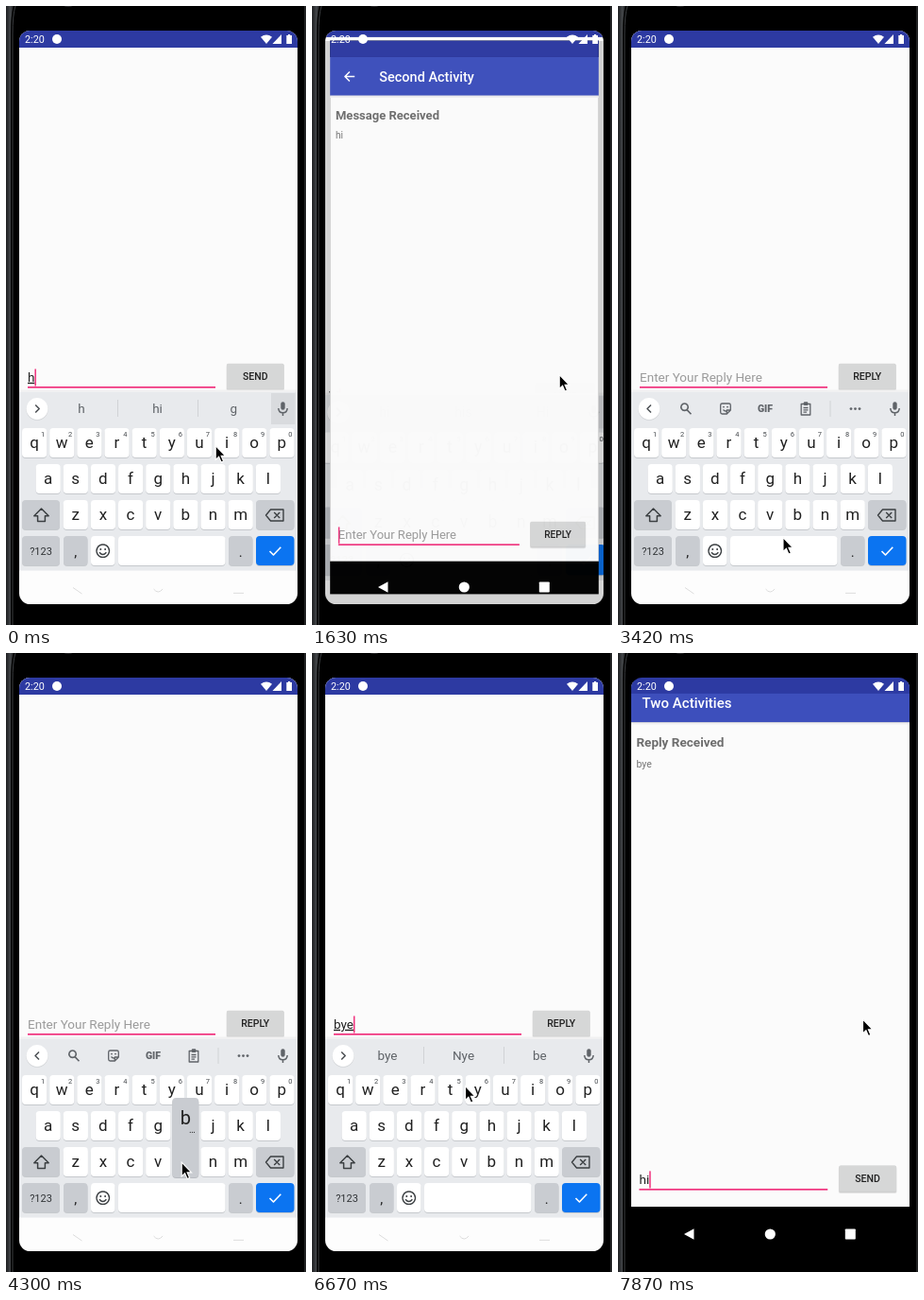
Animation, 318 px wide and 654 px high, one loop 8 s. Source, as an HTML page:

```html
<!DOCTYPE html>
<html lang="en">
<head>
<meta charset="utf-8">
<title>Two Activities</title>
<style>
html, body { margin: 0; width: 100%; height: 100%; overflow: hidden; background: #000; }
svg { display: block; width: 318px; height: 654px; font-family: Roboto, sans-serif; }
text { white-space: pre; }
.mid { text-anchor: middle; }
</style>
</head>
<body>
<svg id="stage" viewBox="0 0 318 654" xmlns="http://www.w3.org/2000/svg">
  <defs>
    <clipPath id="glass"><rect x="14" y="26" width="295" height="606" rx="11.5"/></clipPath>
    <linearGradient id="rim"><stop offset="0" stop-color="#1c1d1f"/><stop offset=".6" stop-color="#45484b"/><stop offset="1" stop-color="#17181a"/></linearGradient>
  </defs>
  <rect width="318" height="654"/>
  <path d="M0 0H8Q5 9 5 30V654H0Z" fill="url(#rim)"/>
  <path d="M10 0Q7 9 7 30V654" stroke="#3a3c3f" fill="none"/>
  <path d="M317 0V654" stroke="#2b2c2e" stroke-width="1.5"/>
  <ellipse cx="66" cy="-1" rx="5" ry="2" fill="#2a2a2c"/>
  <g id="screen" clip-path="url(#glass)"></g>
  <path id="mouse" d="M-.8 0V15L2.6 11.8L5.2 17.6L7.6 16.5L5.1 10.9H9.6Z" stroke="#fff" stroke-width="1.1"/>
</svg>
<script>
const LOOP = 8000, TICK = 148.3, LEAD = 10, LAST = 53;
const INK = '#212121', GREY = '#5f6368', PINK = '#f0307c', BAR = '#3d4fbc', STATUS = '#2d3aa2';
const PAN = 175, CX = 161.5, CY = 329;
const $ = id => document.getElementById(id);
const screen = $('screen');

function el(tag, attrs, parent, text) {
  const node = document.createElementNS('http://www.w3.org/2000/svg', tag);
  for (const key in attrs) node.setAttribute(key, attrs[key]);
  if (text !== undefined) node.textContent = text;
  parent.append(node);
  return node;
}
const group = (parent, attrs = {}) => el('g', attrs, parent);
const box = (p, x, y, width, height, fill, rx = 0) => el('rect', { x, y, width, height, fill, rx }, p);
const label = (p, x, y, size, fill, text, more = {}) =>
  el('text', { x, y, 'font-size': size, fill, ...more }, p, text);
const middle = (p, x, y, size, fill, text, more = {}) =>
  label(p, x, y, size, fill, text, { class: 'mid', ...more });
const line = (p, d, stroke, width = 1.4) =>
  el('path', { d, stroke, fill: 'none', 'stroke-width': width, 'stroke-linejoin': 'round' }, p);
const shape = (p, d, fill) => el('path', { d, fill }, p);
const dot = (p, cx, cy, r, fill) => el('circle', { cx, cy, r, fill }, p);
const show = (node, on) => node.setAttribute('visibility', on ? 'inherit' : 'hidden');
const zoom = s => `translate(${CX} ${CY}) scale(${s}) translate(${-CX} ${-CY})`;

// One app window: panning page with toolbar, message, input and button.
function makeWindow({ title, back, heading, message, action, hint }) {
  const root = group(screen);
  box(root, 14, 26, 295, 606, '#000');
  const page = group(root);
  box(page, 14, 44, 295, 552, '#fbfbfb');
  box(page, 14, 86, 295, 1, '#d2d3d8');
  box(page, 14, 87, 295, 1.5, '#efeff1');
  box(page, 14, 44, 295, 42, BAR);
  if (back) line(page, 'M41 65.2H30.5M35.5 60L30.3 65.2L35.5 70.4', '#fff', 1.5);
  label(page, back ? 68 : 26, 70.7, 15, '#fff', title, { 'font-weight': 500 });
  label(page, 20, 112, 13.5, '#6d6d6d', heading, { 'font-weight': 700 });
  label(page, 20, 133.5, 10.5, '#757575', message);
  const ghost = label(page, 23, 571.8, 13.5, '#9b9b9b', hint);
  const input = label(page, 23, 571.8, 13.5, INK, '');
  box(page, 23, 577, 199, 1.7, PINK);
  const caret = box(page, 23, 558.5, 1.5, 18, PINK);
  box(page, 233.5, 554, 61.5, 28, '#e4e4e4', 2);
  box(page, 234, 553, 60.5, 28, '#cfcfcf', 1.5);
  const button = box(page, 234, 552.7, 60.5, 27, '#d6d7d7', 1.5);
  middle(page, 264.2, 570.2, 10.5, INK, action, { 'font-weight': 500 });
  box(root, 14, 26, 295, 18, STATUS);
  return {
    root,
    update({ text, caretOn, pressed, pan, scale, alpha, composing }) {
      input.textContent = text;
      input.setAttribute('text-decoration', composing ? 'underline' : 'none');
      show(ghost, !text);
      show(caret, caretOn);
      caret.setAttribute('x', 23 + (text ? input.getComputedTextLength() : 0));
      button.setAttribute('fill', pressed ? '#c2c3c3' : '#d6d7d7');
      page.setAttribute('transform', `translate(0 ${-pan})`);
      root.setAttribute('transform', zoom(scale));
      root.setAttribute('opacity', alpha);
    }
  };
}

const first = makeWindow({ title: 'Two Activities', heading: 'Reply Received', message: 'bye', action: 'SEND', hint: '' });
const board = group(screen);
const scrim = box(screen, 14, 37, 295, 595, 'rgba(0,0,0,.17)');
const second = makeWindow({ title: 'Second Activity', back: true, heading: 'Message Received', message: 'hi', action: 'REPLY', hint: 'Enter Your Reply Here' });

// Keyboard
const ROWS = ['qwertyuiop', 'asdfghjkl', 'zxcvbnm'], PITCH = 29.15;
const keyAt = {};
function key(x, y, w, fill = '#fff') {
  box(board, x, y + 1, w, 31, '#c6c9cd', 4);
  box(board, x, y, w, 31, fill, 4);
}
const DARK = '#c9ccd1';
box(board, 14, 405.5, 295, 3, '#f1f1f2');
box(board, 14, 408, 295, 189, '#e8eaed');
box(board, 14, 596.5, 295, 36, '#fdfdfd');
ROWS.forEach((row, r) => [...row].forEach((ch, i) => {
  const x = [30, 44.6, 73.7][r] + i * PITCH, y = 446 + r * 38;
  keyAt[ch] = [x, y];
  key(x - 13, y, 26.2);
  middle(board, x, y + 20.8, 17, INK, ch);
  if (!r) middle(board, x + 9, y + 9, 7.5, '#45494d', (i + 1) % 10);
}));
key(17, 522, 40, DARK);
line(board, 'M37.5 531L29.8 538.8H33.6V544.5H41.4V538.8H45.2Z', '#3c4043', 1.5);
key(265, 522, 40.5, DARK);
line(board, 'M275.5 538L280.5 532H294V544H280.5ZM284.2 535L290.2 541M290.2 535L284.2 541', '#3c4043');
key(17, 560, 40, DARK);
middle(board, 37, 579.6, 11, '#303336', '?123');
key(61, 560, 25.5, DARK);
middle(board, 73.8, 582, 15, INK, ',');
key(90, 560, 25.5);
line(board, 'M102.7 569a6.7 6.7 0 1 0 .1 0ZM99 577.2q3.7 4.6 7.4 0', '#3c4043');
dot(board, 100.3, 574, 1, '#3c4043');
dot(board, 105.1, 574, 1, '#3c4043');
key(119, 560, 113.5);
key(236, 560, 25.5, DARK);
middle(board, 248.8, 582, 15, INK, '.');
key(265, 560, 40.5, '#0b74f1');
line(board, 'M279.5 576L283.5 580L291.3 571.8', '#fff', 1.6);
const faint = line(board, 'M71 614.5L80.5 621M156.5 616q4.8 6 9.6 0M241 620.3H252', '#dcdcdc', 1);

const micGlow = box(board, 281, 409, 25.5, 33, '#d9dbde');
dot(board, 33, 426.2, 11.6, '#d5d7da');
dot(board, 33, 425.5, 11.4, '#fff');
const chevron = line(board, '', '#4a4e52', 1.5);
box(board, 291.3, 418.2, 4.4, 8.6, GREY, 2.2);
line(board, 'M288.8 425q.2 4.8 4.7 4.8t4.7-4.8M293.5 430V433', GREY, 1.5);

const tools = group(board);
line(tools, 'M70.5 420a3.7 3.7 0 1 0 .1 0ZM73.3 426.9L77.5 431.2', GREY, 1.6);
line(tools, 'M110.5 420H117.5Q119.3 420 119.3 421.8V427L115.3 431H110.5Q108.7 431 108.7 429.2V421.8Q108.7 420 110.5 420ZM111.5 426.5q2.5 3 5 0M119 427H115.3V431', GREY, 1.3);
dot(tools, 112, 423.6, .9, GREY);
dot(tools, 116, 423.6, .9, GREY);
middle(tools, 156, 429, 10.5, GREY, 'GIF', { 'font-weight': 900 });
line(tools, 'M194.2 420.5H203.8V432H194.2ZM196.5 424.5H201.5M196.5 426.8H201.5M196.5 429.2H200', GREY, 1.3);
box(tools, 196.8, 418.3, 4.5, 3.6, GREY, 1);
box(tools, 224.5, 417, 1, 17, '#d0d3d6');
for (const x of [247, 251.5, 256]) dot(tools, x, 425.6, 1.4, GREY);

const words = group(board);
box(words, 118, 416, 1, 18, '#d0d3d6');
box(words, 203, 416, 1, 18, '#d0d3d6');
const slots = [80, 160.5, 241.3].map(x => middle(words, x, 430.4, 13.5, GREY, ''));

const popup = group(board);
box(popup, -14, -51, 28, 84, '#b9bcc1', 4);
box(popup, -14, -52, 28, 84, DARK, 4);
const popupChar = middle(popup, 0, -24, 20, INK, '');
middle(popup, 7, -15, 10, INK, '…');

// System icons
const system = group(screen);
label(system, 20, 39, 10.8, '#fff', '2:20');
dot(system, 54, 35, 5, '#fff');
shape(system, 'M270 32.8Q276 28.2 282 32.8L276 40Z', '#fff');
shape(system, 'M292 30V40H282.5Z', '#fff');
shape(system, 'M297.3 31H299V30H301.2V31H303V40H297.3Z', '#fff');
const nav = group(system);
shape(nav, 'M70 614L80.5 608.3V619.7Z', '#fff');
dot(nav, 161.3, 614, 5.6, '#fff');
box(nav, 240.8, 608.5, 11, 11, '#fff', .8);

// Timeline, counted in ticks
const mousePath = [
  [0, 223, 464.5], [4, 223, 464.5], [5, 232, 442], [6, 254, 402], [7, 263, 389.5], [13, 263, 389.5],
  [14, 255, 412], [15, 226, 470], [16, 194, 528], [17, 184, 548], [18, 178, 559], [19, 175.8, 561.5],
  [24, 175.8, 561.5], [26, 187, 538], [32, 187, 538], [34, 175, 466], [35, 173.7, 457.5], [36, 173.7, 457.5],
  [40, 88, 456], [43, 88, 456], [45, 163.3, 457.5], [46, 250, 405], [47, 258, 392], [48, 260.3, 387]
];
const hints = [[0, 'h hi g'], [3, 'hi his Hi'], [31, 'b but best'], [36, 'by but buy'], [43, 'bye Nye be']];
const sent = [[0, 'h'], [3, 'hi']];
const reply = [[0, ''], [31, 'b'], [36, 'by'], [43, 'bye']];
const presses = [[0, ''], [1, 'i'], [3, ''], [29, 'b'], [31, ''], [35, 'y'], [36, ''], [41, 'e'], [43, '']];
const carets = [[0, true], [7, false], [10, true], [14, false], [17, true], [21, false], [25, true], [28, false],
  [31, true], [35, false], [36, true], [39, false], [43, true], [47, false], [51, true]];

const at = (table, n) => table.filter(row => row[0] <= n).pop()[1];
function pointAt(n) {
  const i = mousePath.findIndex(p => p[0] > n);
  if (i < 0) return mousePath[mousePath.length - 1].slice(1);
  const [t0, x0, y0] = mousePath[i - 1], [t1, x1, y1] = mousePath[i];
  const k = (n - t0) / (t1 - t0);
  return [x0 + (x1 - x0) * k, y0 + (y1 - y0) * k];
}

function draw(n) {
  const caretOn = at(carets, n);
  const opening = n === 11 || n === 12, closing = n === 52, settled = n === LAST;
  const lowerScale = n === 11 || closing ? 1.039 : settled ? 1.004 : 1;
  first.update({
    text: at(sent, n), caretOn, pressed: n === 9 || n === 10,
    pan: settled ? 12 : opening ? 157 : PAN, scale: lowerScale, alpha: 1, composing: n < 13
  });
  show(second.root, n >= 11 && !settled);
  second.update({
    text: at(reply, n), caretOn, pressed: n === 51,
    pan: n < 22 ? 0 : n === 22 ? 110 : PAN,
    scale: n === 11 ? .965 : n === 12 ? .995 : closing ? .95 : 1,
    alpha: n === 11 ? .98 : closing ? .15 : 1, composing: true
  });

  const typing = n < 13 || (n >= 22 && !settled);
  screen.insertBefore(board, opening ? scrim : closing ? second.root : system);
  show(scrim, opening);
  show(board, typing);
  show(faint, typing && !opening);
  show(nav, !typing || opening);
  board.setAttribute('transform', n === 22 ? 'translate(0 45)' : zoom(lowerScale));
  const toolbar = n >= 13 && n < 31;
  show(tools, typing && toolbar);
  show(words, typing && !toolbar);
  show(micGlow, n < 13);
  chevron.setAttribute('d', toolbar ? 'M35 421.5L31 425.5L35 429.5' : 'M31.2 421.5L35.2 425.5L31.2 429.5');
  at(hints, n).split(' ').forEach((word, i) => slots[i].textContent = word);

  const down = at(presses, n);
  show(popup, down);
  if (down) {
    popupChar.textContent = down;
    popup.setAttribute('transform', `translate(${keyAt[down]})`);
  }
  $('mouse').setAttribute('transform', `translate(${pointAt(n)})`);
}

let last = -1;
function tick() {
  const n = Math.min(LAST, Math.floor((performance.now() % LOOP + LEAD) / TICK));
  if (n !== last) draw(last = n);
  requestAnimationFrame(tick);
}
tick();
</script>
</body>
</html>
```
